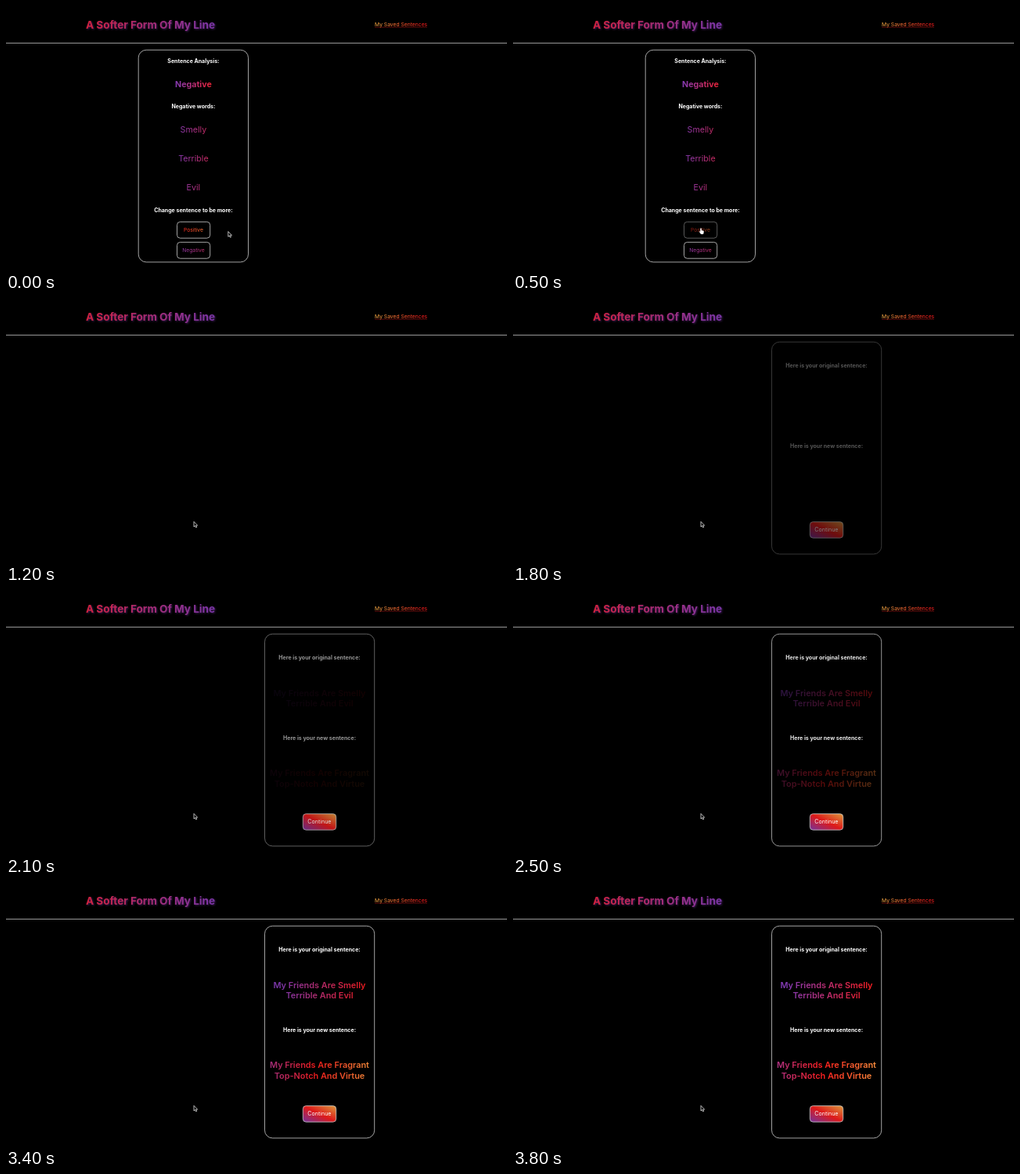
These frames come from a looping animation (640x338 px, 3.9 s). An HTML page:

```html
<!DOCTYPE html>
<html lang="en">
<head>
<meta charset="utf-8">
<title>Sentence changer</title>
<style>
  html, body { margin: 0; width: 100%; height: 100%; overflow: hidden; background: #000; }
  svg { display: block; width: 640px; height: 338px; font: 6.75px Inter, sans-serif; }
  .mid { text-anchor: middle; }
  .head { font-weight: 700; font-size: 7.03px; fill: #fff; }
  .word { font-size: 10.67px; }
  .bold { font-weight: 700; }
  .line { font-weight: 600; font-size: 10.9px; }
  .box { fill: none; stroke: #ccc; stroke-width: .8; }
  #title { font-weight: 700; font-size: 13.55px; filter: drop-shadow(1px 1px 1px #833ab480); }
</style>
</head>
<body>
<svg viewBox="0 0 640 338">
  <defs id="defs"></defs>
  <text id="title" x="102" y="28.6" fill="url(#titleInk)" fill-opacity=".92">A Softer Form Of My Line</text>
  <text x="471" y="26" fill="url(#linkInk)">My Saved Sentences</text>
  <path d="M471 27.2H538" stroke="#b81818" stroke-width=".5"/>
  <path d="M0 47.5H640" stroke="#999"/>

  <g id="analysis" class="mid">
    <rect class="box" x="169.2" y="56.3" width="140.3" height="271.6" rx="10"/>
    <text class="head" x="239.4" y="72.8">Sentence Analysis:</text>
    <text class="word bold" x="239.4" y="104" fill="url(#moodInk)">Negative</text>
    <text class="head" x="239.4" y="130.8">Negative words:</text>
    <g class="word" fill="url(#wordInk)">
      <text x="239.4" y="162">Smelly</text>
      <text x="239.4" y="199">Terrible</text>
      <text x="239.4" y="236">Evil</text>
    </g>
    <text class="head" x="239.4" y="263.6">Change sentence to be more:</text>
    <g id="positive">
      <rect class="box" x="218.5" y="276.4" width="42.2" height="20.8" rx="4"/>
      <text x="239.4" y="289" fill="url(#goodInk)">Positive</text>
    </g>
    <rect class="box" x="218.5" y="302.4" width="42.2" height="20.8" rx="4"/>
    <text x="239.4" y="315.2" fill="url(#wordInk)">Negative</text>
  </g>

  <g class="mid">
    <g id="result">
      <rect class="box" x="330.5" y="56.3" width="140.2" height="271.6" rx="10"/>
      <text class="head" x="400.5" y="88.8">Here is your original sentence:</text>
      <text class="head" x="400.5" y="191.8">Here is your new sentence:</text>
      <g id="lines" class="line">
        <g fill="url(#oldInk)">
          <text x="400.5" y="135.6">My Friends Are Smelly</text>
          <text x="400.5" y="149">Terrible And Evil</text>
        </g>
        <g fill="url(#newInk)">
          <text x="400.5" y="238.4">My Friends Are Fragrant</text>
          <text x="400.5" y="251.8">Top-Notch And Virtue</text>
        </g>
      </g>
    </g>
    <g id="button">
      <rect x="379.3" y="286.6" width="42.4" height="20.6" rx="4" fill="url(#buttonInk)" fill-opacity=".88" stroke="#ccc" stroke-width=".8"/>
      <text x="400.4" y="299.2" font-size="7.1" fill="#fff">Continue</text>
    </g>
  </g>

  <g id="cursor" stroke="#fff" stroke-width=".7" stroke-linejoin="round">
    <path id="arrow" d="M0 0V6.6L1.5 5.3L2.6 7.6L3.7 7.1L2.7 4.9H4.6Z" fill="#000"/>
    <path id="hand" d="M-.6 -1.4Q0 -2 .6 -1.4V1L3.2 1.7Q3.8 2 3.6 3L3 5.6H.1L-1.9 2.6Q-1.7 1.8 -.6 2.6Z" fill="#fff" stroke-width=".4"/>
  </g>
</svg>
<script>
const $ = id => document.getElementById(id);
const purple = '#833ab4', red = '#fd1d1d', orange = '#fcb045';

function gradient(id, [x1, y1, x2, y2], ...colors) {
  const stops = colors.map((c, i) =>
    `<stop offset="${i / (colors.length - 1)}" stop-color="${c}"/>`).join('');
  $('defs').innerHTML += `<linearGradient id="${id}" gradientUnits="userSpaceOnUse"
    x1="${x1}" y1="${y1}" x2="${x2}" y2="${y2}">${stops}</linearGradient>`;
}
gradient('titleInk', [50, 0, 267, 0], red, purple);
gradient('linkInk', [471, 0, 530, 0], orange, red);
gradient('moodInk', [216, 0, 272, 0], purple, red);
gradient('wordInk', [218, 0, 290, 0], purple, red);
gradient('goodInk', [222, 0, 275, 0], red, orange);
gradient('oldInk', [350, 0, 462, 0], purple, red);
gradient('newInk', [307, 0, 485, 0], purple, red, orange);
gradient('buttonInk', [392.4, 313.6, 408.6, 280.2], purple, red, orange);

const ramp = (t, from, to) => Math.min(1, Math.max(0, (t - from) / (to - from)));
const fade = (id, opacity) => $(id).setAttribute('opacity', opacity);

function draw(now) {
  const t = Math.floor(now % 3900 / 100) * 100;
  const move = ramp(t, 0, 400);
  const glide = move * move * (3 - 2 * move);
  const hover = t >= 300 && t < 1100;

  fade('analysis', 1 - ramp(t, 600, 1200));
  fade('positive', 1 - .45 * ramp(t, 200, 500));
  fade('result', ramp(t, 1400, 2600));
  fade('button', ramp(t, 1400, 2200));
  fade('lines', ramp(t, 1900, 3500));
  fade('arrow', hover ? 0 : 1);
  fade('hand', hover ? 1 : 0);
  $('cursor').setAttribute('transform',
    `translate(${283.8 - 43.8 * glide} ${288.7 - 2.4 * glide})`);
  requestAnimationFrame(draw);
}
requestAnimationFrame(draw);
</script>
</body>
</html>
```
